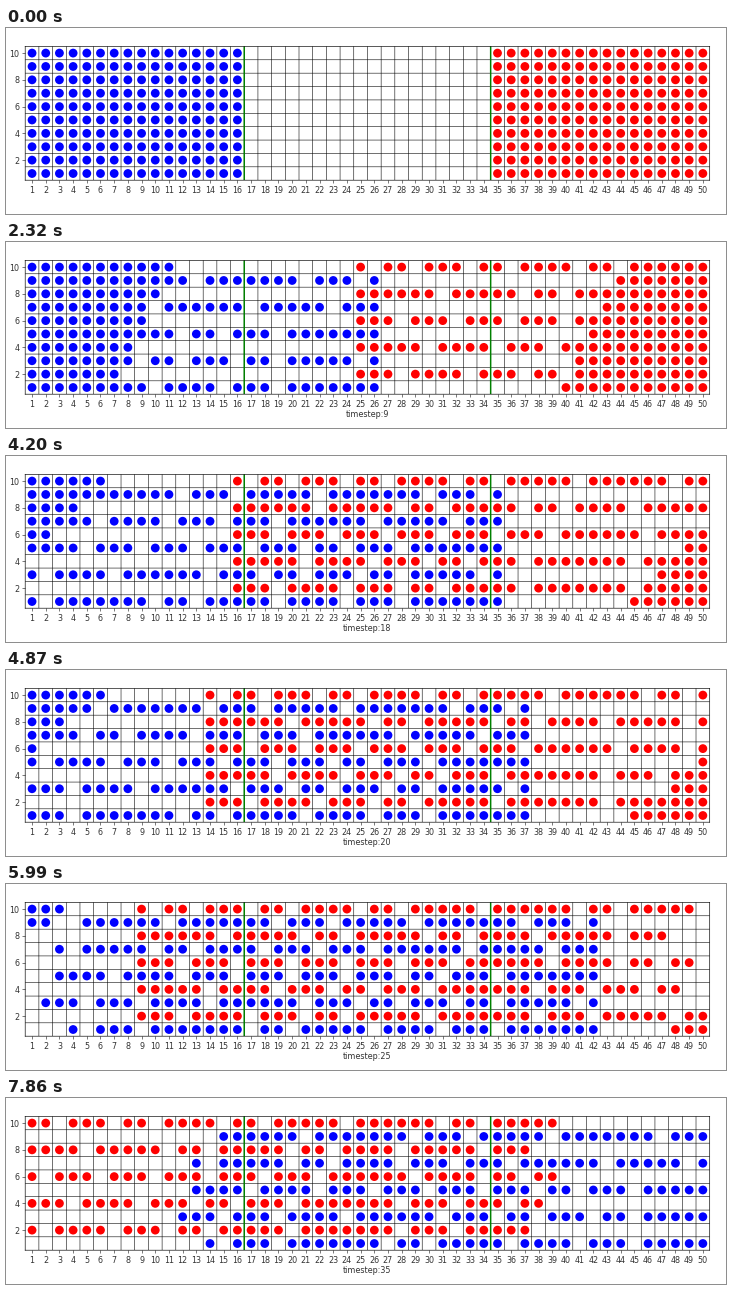
Recreate the animation shown at these times as a matplotlib script. Size 720 by 186 pixels, loop 8 s.

```python
import random

import numpy as np
import matplotlib.pyplot as plt
from matplotlib.animation import FuncAnimation

W, H, DPI = 720, 186, 100
PX = 72 / DPI
LOOP, FRAMES = 8000, 250
INTERVAL = LOOP // FRAMES
COLS, ROWS, HOME = 50, 10, 16

# Bursts of evenly spaced steps: first ms, last ms, number of steps
BURSTS = [(200, 200, 1), (540, 3640, 15), (3880, 4200, 3),
          (4530, 5505, 6), (5870, 7860, 11)]
STEP_TIMES = np.concatenate([np.linspace(*burst) for burst in BURSTS])

# First two run lengths of each lane's stream, from row 1 upwards
HEADS = [(7, 3), (3, 4), (1, 5), (5, 4), (7, 3),
         (3, 3), (3, 5), (6, 5), (1, 3), (1, 2)]


def make_stream(head, rng):
    """Lags behind the leader: runs with one-cell gaps, for two lanes' walkers."""
    lags, start, runs = [], 0, list(head)
    while len(lags) < 2 * HOME:
        run = runs.pop(0) if runs else rng.choice((2, 2, 3, 3, 4, 5, 6, 7))
        lags.extend(range(start, start + run))
        start += run + 1
    return lags[:2 * HOME]


rng = random.Random(5)
STREAMS = [make_stream(head, rng) for head in HEADS]


def lane_cells(row, depth, moving, step):
    """Occupied columns of one group in one lane, counted from its own side."""
    age = step + 1
    queue = round(HOME - (0.5 + 0.055 * depth) * age)
    cells = set(range(1, queue + 1))
    if moving:
        cells |= {HOME + age - lag for lag in STREAMS[row - 1]}
    return [c for c in cells if 1 <= c <= COLS]


def walkers(step):
    """Positions and colours: blue streams on odd rows, red ones on even rows."""
    places, colors = [], []
    for row in range(1, ROWS + 1):
        blue = lane_cells(row, ROWS - row, row % 2 == 1, step)
        red = lane_cells(row, row - 1, row % 2 == 0, step)
        places += [(c, row) for c in blue] + [(COLS + 1 - c, row) for c in red]
        colors += ["blue"] * len(blue) + ["red"] * len(red)
    return places, colors


plt.rcParams["font.family"] = "DejaVu Sans"
fig = plt.figure(figsize=(W / DPI, H / DPI), dpi=DPI, facecolor="white")
LEFT, RIGHT, TOP, BOTTOM = 19.2, 703.7, 18.4, 152.2
INK = "0.2"
ax = fig.add_axes([LEFT / W, 1 - BOTTOM / H, (RIGHT - LEFT) / W, (BOTTOM - TOP) / H])
ax.set_xlim(0.5, COLS + 0.5)
ax.set_ylim(0.5, ROWS + 0.5)
ax.set_xticks(range(1, COLS + 1))
ax.set_yticks(range(2, ROWS + 1, 2))
ax.tick_params(labelsize=8 * PX, length=2.8 * PX, width=0.64 * PX, pad=2.8 * PX,
               color=INK, labelcolor=INK)
for spine in ax.spines.values():
    spine.set(linewidth=0.64 * PX, snap=False)

grid = dict(color="black", lw=0.55 * PX, zorder=1, snap=False)
ax.vlines(np.arange(1.5, COLS), 0.5, ROWS + 0.5, **grid)
ax.hlines(np.arange(1.5, ROWS), 0.5, COLS + 0.5, **grid)
ax.vlines([HOME + 0.5, COLS - HOME + 0.5], 0.5, ROWS + 0.5,
          color="green", lw=1.5 * PX, zorder=2, snap=False)

dots = ax.scatter([], [], s=(8.8 * PX) ** 2, linewidths=0, zorder=3)
label = fig.text((LEFT + RIGHT) / 2 / W, 1 - 174.6 / H, "", size=8 * PX,
                 color=INK, ha="center", va="baseline")


def draw(frame):
    now = (frame + 1) * INTERVAL - 1
    step = int(np.searchsorted(STEP_TIMES, now, side="right")) - 1
    places, colors = walkers(step)
    dots.set_offsets(places)
    dots.set_facecolors(colors)
    label.set_text(f"timestep:{step}" if step >= 0 else "")
    return dots, label


anim = FuncAnimation(fig, draw, frames=FRAMES, interval=INTERVAL, repeat=True)
plt.show()
```
